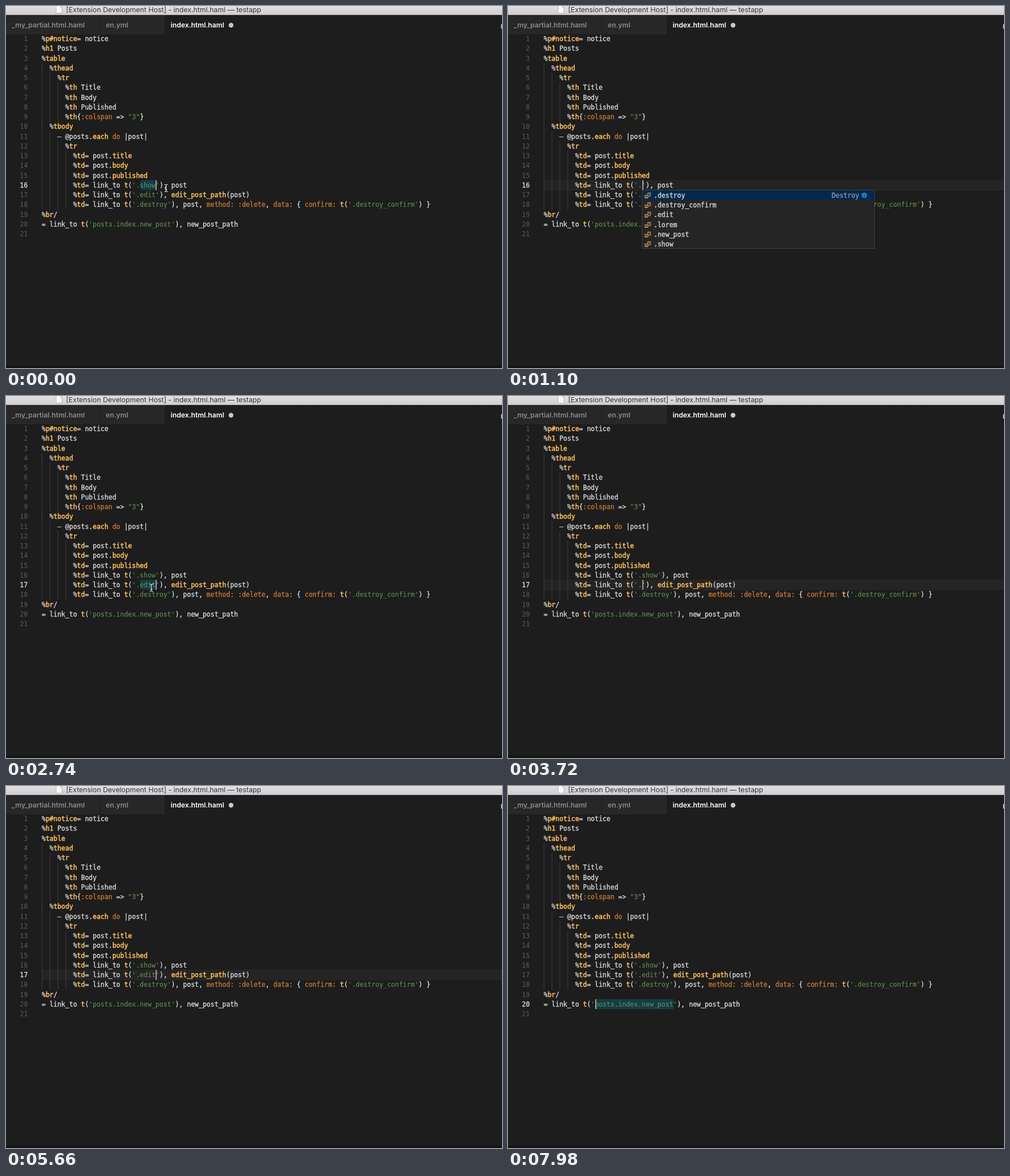
An HTML page with a canvas for the animation above (8 s loop, 875 by 640 pixels).

```html
<!DOCTYPE html>
<html lang="en">
<head>
<meta charset="utf-8">
<title>Editor completion</title>
<style>
  html, body { margin: 0; width: 100%; height: 100%; overflow: hidden; background: #1d1d1d; }
  canvas { display: block; width: 875px; height: 640px; }
</style>
</head>
<body>
<canvas id="stage"></canvas>
<script>
const W = 875, H = 640, LOOP = 8000;
const LEFT = 63, CHAR = 6.925, ROW = 17.25, BLINK = 500;
const MONO = '11.5px "DejaVu Sans Mono", monospace';
const TITLE = '12.33px Inter, sans-serif';
const TAB = '600 12.2px Inter, sans-serif';
const WHITE = '#d8d8d8', YELLOW = '#ffc05c', ORANGE = '#cc7832', GREEN = '#619150';
const ACTIVE_ROW = '#032a4e';

const canvas = document.getElementById('stage');
const ctx = canvas.getContext('2d');
const ratio = window.devicePixelRatio || 1;
canvas.width = W * ratio;
canvas.height = H * ratio;
ctx.scale(ratio, ratio);

const sourceLines = (show, edit) => `%p#notice= notice
%h1 Posts
%table
  %thead
    %tr
      %th Title
      %th Body
      %th Published
      %th{:colspan => "3"}
  %tbody
    – @posts.each do |post|
      %tr
        %td= post.title
        %td= post.body
        %td= post.published
        %td= link_to t('.${show}'), post
        %td= link_to t('.${edit}'), edit_post_path(post)
        %td= link_to t('.destroy'), post, method: :delete, data: { confirm: t('.destroy_confirm') }
%br/
= link_to t('posts.index.new_post'), new_post_path
`.split('\n');

const ITEMS = [
  ['.destroy', 'Destroy'], ['.destroy_confirm', 'Are you sure?'], ['.edit', 'Edit'],
  ['.lorem', 'Lorem ipsum'], ['.new_post', 'New Post'], ['.show', 'Show details']
];
const SHOW_ONLY = ITEMS.slice(5);

// time, line, key on line 16, key on line 17, selection anchor, caret column, list, active item
const STEPS = [
  [0, 16, 'show', 'edit', 25, 29],
  [640, 16, '', 'edit', 25, 25],
  [780, 16, '', 'edit', 25, 25, ITEMS, 0],
  [1600, 16, 's', 'edit', 26, 26, SHOW_ONLY, 0],
  [1880, 16, 'sh', 'edit', 27, 27, SHOW_ONLY, 0],
  [2060, 16, 'show', 'edit', 29, 29],
  [2440, 17, 'show', 'edit', 25, 29],
  [3720, 17, 'show', '', 25, 25],
  ...[[3900, 0], [4160, 1], [4340, 2], [4520, 3], [4700, 4], [4880, 5], [5060, 4], [5240, 3], [5440, 2]]
    .map(([t, active]) => [t, 17, 'show', '', 25, 25, ITEMS, active]),
  [5660, 17, 'show', 'edit', 29, 29],
  [6280, 20, 'show', 'edit', 33, 33],
  [7300, 20, 'show', 'edit', 33, 25],
  [7500, 20, 'show', 'edit', 33, 19],
  [7700, 20, 'show', 'edit', 33, 13]
].map(([t, line, show, edit, anchor, caret, list, active]) =>
  ({ t, line, show, edit, anchor, caret, list, active }));

// The caret blink restarts on edits and caret moves, not on list navigation.
STEPS.forEach((step, i) => {
  const prev = STEPS[i - 1];
  const same = prev && ['line', 'show', 'edit', 'caret'].every(k => prev[k] === step[k]);
  step.since = same ? prev.since : step.t;
});

// start, arrival, hide time, from, to
const POINTER = [
  [0, 1, 500, [282, 322], [282, 322]],
  [2120, 2400, 3660, [282, 322], [256, 339]],
  [5800, 6220, 7240, [256, 339], [291, 391]]
];

const colX = col => LEFT + col * CHAR;
const lineY = line => 58 + (line - 1) * ROW;

function rect(x, y, w, h, color) {
  ctx.fillStyle = color;
  ctx.fillRect(x, y, w, h);
}

function disc(x, y, r, color) {
  ctx.fillStyle = color;
  ctx.beginPath();
  ctx.arc(x, y, r, 0, Math.PI * 2);
  ctx.fill();
}

function text(str, x, y, color, font = MONO, align = 'left', weight = 0) {
  ctx.font = font;
  ctx.textAlign = align;
  ctx.fillStyle = ctx.strokeStyle = color;
  ctx.lineWidth = weight;
  ctx.fillText(str, x, Math.round(y + 4));
  if (weight) ctx.strokeText(str, x, Math.round(y + 4));
}

const TOKENS = /(?<string>'[^']*'|"[^"]*")|%(?<tag>[\w#]+)|(?<key>:\w+|\w+:|\bdo\b)|(?<call>\bt(?=\()|edit_post_path|(?<=\.)\w+)/g;
const WEIGHTS = { [WHITE]: .35, [YELLOW]: .5, [ORANGE]: .3, [GREEN]: .1 };

function codeLine(str, y) {
  const put = (part, col, color) =>
    part.trim() && text(part, colX(col), y, color, MONO, 'left', WEIGHTS[color]);
  // Leading blanks are skipped so that each run starts on its own column.
  let col = str.search(/\S|$/);
  for (const m of str.matchAll(TOKENS)) {
    const g = m.groups;
    put(str.slice(col, m.index), col, WHITE);
    if (g.tag) {
      put('%', m.index, WHITE);
      put(g.tag, m.index + 1, YELLOW);
    } else {
      put(m[0], m.index, g.string ? GREEN : g.key ? ORANGE : YELLOW);
    }
    col = m.index + m[0].length;
  }
  put(str.slice(col), col, WHITE);
}

function drawWindow() {
  rect(0, 0, W, H, '#1d1d1d');
  const bar = ctx.createLinearGradient(0, 0, 0, 16);
  bar.addColorStop(0, '#e2dfe2');
  bar.addColorStop(1, '#d0cdd0');
  rect(0, 0, W, 16, bar);
  rect(0, 15, W, 1, '#b3b0b3');
  rect(88, 0, 11, 13, '#b9b9b9');
  rect(89, 0, 9, 12, '#fafafa');
  rect(95, 0, 3, 3, '#d8d8d8');
  text('[Extension Development Host] - index.html.haml — testapp', 106, 6.5, '#363436', TITLE);

  rect(0, 16, 281, 34, '#272727');
  rect(165, 16, 1, 34, '#1d1d1d');
  rect(280, 16, 1, 34, '#1d1d1d');
  text('_my_partial.html.haml', 10, 34, '#8b8b8b', TAB);
  text('en.yml', 176, 34, '#8b8b8b', TAB);
  text('index.html.haml', 290.5, 34, '#ffffff', TAB);
  disc(397, 34, 4.2, '#c8c8c8');
  rect(873.5, 32, 1.5, 8, '#d0d0d0');
  rect(0, 636, W, 4, '#141414');
}

function drawGuides() {
  const spans = [[0, 4, 18], [2, 5, 9], [2, 11, 18], [4, 6, 9], [4, 12, 18], [6, 13, 18]];
  for (const [col, first, last] of spans) {
    const top = Math.round(lineY(first) - 8.6);
    rect(Math.round(colX(col)), top, 1, Math.round(lineY(last) + 8.6) - top, '#3c3c3c');
  }
}

function drawIcon(x, y) {
  ctx.lineWidth = 1;
  ctx.strokeStyle = '#d99a45';
  ctx.strokeRect(x + 5.5, y - 4.5, 5, 5);
  ctx.strokeRect(x + .5, y - .5, 5, 5);
  rect(x + 2, y + 1, 2, 1, '#c5c5c5');
  rect(x + 2, y + 3, 2, 1, '#c5c5c5');
  rect(x + 7, y - 3, 2, 1, '#c5c5c5');
  rect(x + 6, y + 2, 4, 1, '#8a6a3e');
}

function drawList({ line, caret, list, active, show }) {
  const x = Math.round(colX(caret) + .8), top = Math.floor(lineY(line) + 8.6);
  const height = Math.ceil(list.length * ROW);
  rect(x - 1, top, 411, height, '#414141');
  rect(x, top + 1, 409, height - 2, '#252526');
  list.forEach(([name, detail], i) => {
    const y = lineY(line) + 18 + i * ROW;
    if (i === active) {
      rect(x, Math.round(y - 8.5), 409, 17, ACTIVE_ROW);
      text(detail, x + 382.5, y, '#8f9ba6', MONO, 'right', .3);
      disc(x + 391.5, y, 4.8, '#1c83b5');
      rect(x + 391, y - 1, 1, 4, '#0a2c46');
      rect(x + 391, y - 3, 1, 1, '#0a2c46');
    }
    drawIcon(x + 4, Math.round(y));
    const matched = list === SHOW_ONLY ? show.length : 0;
    const put = (part, col, color, weight) =>
      text(part, x + 20 + col * CHAR, y, color, MONO, 'left', weight);
    put(name[0], 0, WHITE, .35);
    put(name.slice(1, 1 + matched), 1, '#1290f0', .55);
    put(name.slice(1 + matched), 1 + matched, WHITE, .35);
  });
}

function drawPointer(t) {
  const move = POINTER.find(([start, , hide]) => t >= start && t < hide);
  if (!move) return;
  const [start, arrive, , from, to] = move;
  const p = Math.min(1, (t - start) / (arrive - start));
  const ease = p * p * (3 - 2 * p);
  const [x, y] = from.map((v, i) => Math.round(v + (to[i] - v) * ease));
  ctx.beginPath();
  ctx.moveTo(x - 2.5, y - 6.5);
  ctx.quadraticCurveTo(x + .5, y - 6.5, x + .5, y - 4);
  ctx.lineTo(x + .5, y + 4);
  ctx.quadraticCurveTo(x + .5, y + 6.5, x - 2.5, y + 6.5);
  ctx.moveTo(x + 3.5, y - 6.5);
  ctx.quadraticCurveTo(x + .5, y - 6.5, x + .5, y - 4);
  ctx.moveTo(x + .5, y + 4);
  ctx.quadraticCurveTo(x + .5, y + 6.5, x + 3.5, y + 6.5);
  ctx.moveTo(x - 1.5, y + 2.5);
  ctx.lineTo(x + 2.5, y + 2.5);
  ctx.strokeStyle = '#e4e4e4';
  ctx.lineWidth = 1.1;
  ctx.stroke();
}

function draw(t) {
  const step = STEPS.findLast(s => s.t <= t);
  const { line, anchor, caret } = step;
  const top = Math.round(lineY(line) - 8.6);
  drawWindow();

  if (anchor === caret) {
    rect(64, top, W - 64, 18, '#292929');
    rect(64, top + 1, W - 64, 16, '#242424');
  } else {
    const from = Math.min(anchor, caret);
    rect(colX(from) + .8, top, Math.abs(anchor - caret) * CHAR, 17.5, '#153c46');
  }
  drawGuides();

  sourceLines(step.show, step.edit).forEach((str, i) => {
    const n = i + 1, on = n === line;
    text(n, 38.3, lineY(n), on ? '#d0d0d0' : '#5a5a5a', MONO, 'right', on ? .4 : 0);
    codeLine(str, lineY(n));
  });

  if ((t - step.since) % (2 * BLINK) < BLINK) {
    rect(Math.round(colX(caret) + .6), top, 1.6, 17.5, '#bcbcbc');
  }
  if (step.list) drawList(step);
  drawPointer(t);
}

const began = performance.now();
function tick() {
  draw((performance.now() - began) % LOOP);
  requestAnimationFrame(tick);
}
tick();
</script>
</body>
</html>
```
